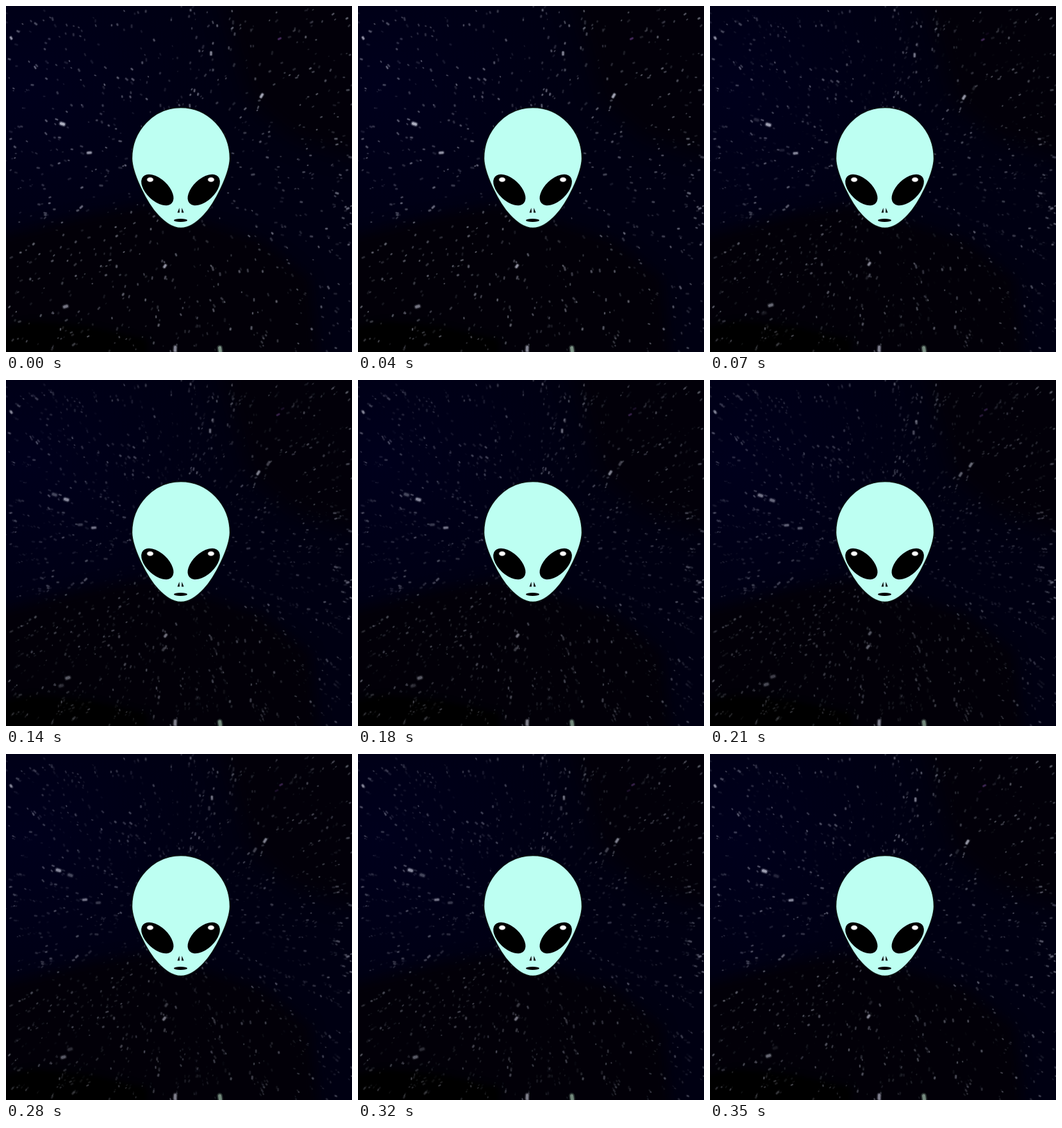
Recreate the animation shown at these times as an HTML page with a canvas. Size 540 by 540 pixels, loop 0.42 s.

```html
<!DOCTYPE html>
<html lang="en">
<head>
<meta charset="utf-8">
<title>Alien in space</title>
<style>
  html, body { margin: 0; width: 100%; height: 100%; overflow: hidden; background: #000010; }
  canvas, svg { position: absolute; left: 0; top: 0; width: 540px; height: 540px; }
</style>
</head>
<body>
<canvas id="sky" width="540" height="540"></canvas>
<svg viewBox="0 0 540 540">
  <path d="M273 158.5C315 158.5 349.5 194 349.5 238C349 262 326 308 309 326C297 339 286 346.500 273 346.500C260 346.500 249 339 237 326C220 308 197 262 196.500 238C196.500 194 231 158.500 273 158.500Z" fill="#bdfff2" stroke="#0b1210" stroke-width="1.4"/>
  <g id="half">
    <ellipse cx="236.300" cy="287" rx="30.500" ry="17" transform="rotate(43 236.300 287)"/>
    <ellipse cx="225" cy="271" rx="5" ry="3.500" fill="#fff" stroke="#777" stroke-width=".8"/>
    <path d="M270.500 315L271 322.500H267.500Z"/>
  </g>
  <use href="#half" transform="translate(545) scale(-1 1)"/>
  <ellipse cx="272.500" cy="334.500" rx="10.500" ry="2.500"/>
</svg>
<script>
const ctx = document.getElementById('sky').getContext('2d');
const SIZE = 540, CX = 270, CY = 260;
const STEP = 70, STEPS = 6, SPEED = 3.6;

let seed = 11;
const rnd = () => (seed = seed * 16807 % 2147483647) / 2147483647;

const stars = [];
function addStar(x, y, light, size, color = '#c8cadb') {
  const edge = Math.min(x, y, SIZE - x, SIZE - y);
  const dir = Math.atan2(CY - y, CX - x);
  const speed = SPEED * Math.min(1, edge / 95);
  const tilt = dir + (rnd() - .5) * 1.2;
  const len = size * (.3 + rnd() * .9);
  stars.push({
    x, y, light, size, color,
    vx: Math.cos(dir) * speed, vy: Math.sin(dir) * speed,
    lx: Math.cos(tilt) * len / 2, ly: Math.sin(tilt) * len / 2
  });
}
for (let i = 0; i < 900; i++)
  addStar(rnd() * SIZE, rnd() * SIZE, .1 + .4 * rnd() ** 2, 1.5 + rnd() * 1.7);

// A few stars stand out
addStar(88, 184, 1, 5);
addStar(130, 229, .8, 4);
addStar(248, 406, .8, 4);
addStar(93, 469, .6, 5);
addStar(399, 140, .9, 4);
addStar(320, 74, .7, 3.5);
addStar(8, 50, .8, 3.5);
addStar(264, 535, .7, 5);
addStar(334, 536, .8, 6, '#a9c9b4');
addStar(427, 51, .6, 3, '#7a4a9c');

function shade(color, blur, ...pts) {
  ctx.filter = `blur(${blur}px)`;
  ctx.fillStyle = color;
  ctx.beginPath();
  for (let i = 0; i < pts.length; i += 2) ctx.lineTo(pts[i], pts[i + 1]);
  ctx.fill();
}

function drawSpace() {
  ctx.globalAlpha = 1;
  ctx.filter = 'none';
  const glow = ctx.createRadialGradient(30, 130, 0, 30, 130, 300);
  glow.addColorStop(0, '#00001c');
  glow.addColorStop(1, '#000012');
  ctx.fillStyle = glow;
  ctx.fillRect(0, 0, SIZE, SIZE);
  shade('#020009', 16, 330, -30, 380, 150, 450, 210, 570, 245, 570, -30);
  shade('#020008', 10, -30, 365, 130, 325, 220, 310, 400, 365, 475, 425, 490, 570, -30, 570);
  shade('#000', 5, -20, 505, 40, 492, 130, 500, 220, 520, 220, 560, -20, 560);
  ctx.filter = 'none';
}

function drawStars(shift, alpha) {
  ctx.lineCap = 'round';
  const line = (s, width, light) => {
    const x = s.x + s.vx * shift, y = s.y + s.vy * shift;
    ctx.globalAlpha = light * alpha;
    ctx.lineWidth = width;
    ctx.beginPath();
    ctx.moveTo(x - s.lx, y - s.ly);
    ctx.lineTo(x + s.lx, y + s.ly);
    ctx.stroke();
  };
  for (const s of stars) {
    ctx.strokeStyle = s.color;
    line(s, s.size * 1.5, s.light * .3);
    line(s, s.size * .85, s.light * .8);
  }
}

// Stars drift inward in steps; two copies cross-fade to close the loop
let last = -1;
function frame() {
  const step = Math.floor(performance.now() / STEP) % STEPS;
  if (step !== last) {
    last = step;
    const shift = (step + 3) % STEPS - 3;
    const fade = Math.abs(shift) / STEPS;
    drawSpace();
    drawStars(shift, (1 - fade) ** .8);
    if (fade) drawStars(shift < 0 ? shift + STEPS : shift - STEPS, fade);
  }
  requestAnimationFrame(frame);
}
frame();
</script>
</body>
</html>
```
